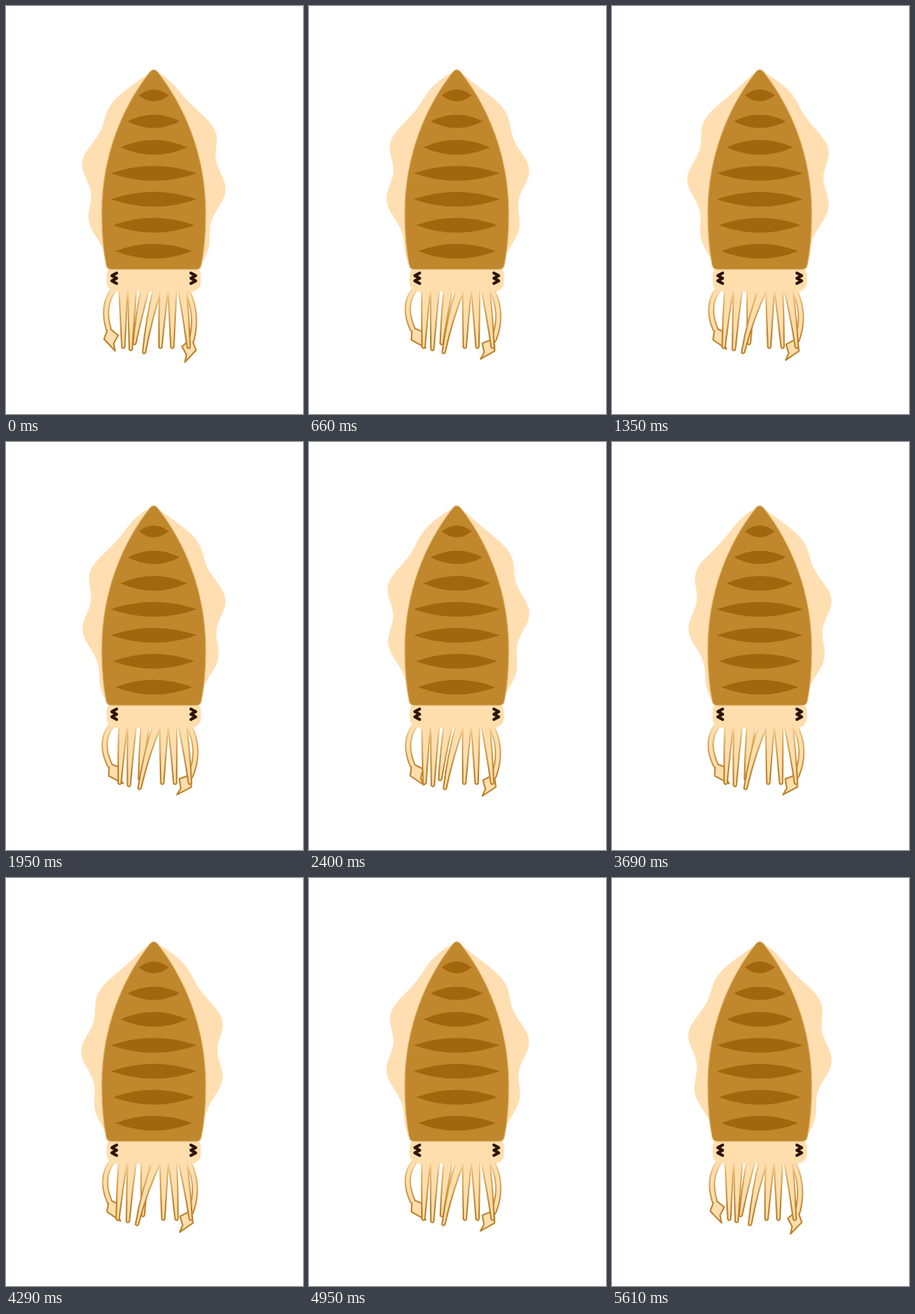
Recreate the animation shown at these times as an HTML page with a canvas. Size 400 px wide and 550 px high, loop 5.64 s.

```html
<!DOCTYPE html>
<html>
<head>
<meta charset="utf-8">
<style>
html, body { margin: 0; width: 400px; height: 550px; overflow: hidden; background: #fff }
canvas { display: block }
</style>
</head>
<body>
<canvas id="stage" width="400" height="550"></canvas>
<script>
const g = document.getElementById('stage').getContext('2d');
const CREAM = '#ffdead', FIN = '#ffdfb1', BROWN = '#c0872d', DARK = '#a0670f', EYE = '#2b1400';
const OUTLINE = '#bd8228', RIM = '#e0b065';
const HALF = 1410, STEP = 30, CENTER = 199, TOP = 87, BOTTOM = 352;

const fade = g.createLinearGradient(0, 380, 0, 445);
fade.addColorStop(0, CREAM);
fade.addColorStop(.3, '#dfb063');
fade.addColorStop(1, OUTLINE);

const body = new Path2D('M193 90Q199 82 205 90C240 135 269 200 269 280Q269 320 263 349' +
  'Q262 355 256 355H142Q136 355 135 349Q129 320 129 280C129 200 158 135 193 90Z');
const club = new Path2D('M0-2L6 14L-9 30L-7 20L-13 9Z');

// Base x, tip x, tip y, drift of the tip
const tentacles = [
  [188, 173, 455, 12], [158, 158, 460, -8], [170, 168, 463, -4], [205, 186, 467, -10],
  [213, 208, 460, 4], [224, 224, 460, 6], [237, 246, 460, 3]
];
const stripes = [20, 35, 45, 58, 58, 55, 52];

function paint(path, color, line, width) {
  if (color) {
    g.fillStyle = color;
    g.fill(path);
  }
  if (line) {
    g.strokeStyle = line;
    g.lineWidth = width;
    g.stroke(path);
  }
}

// Draws in coordinates that grow outward from the middle line
function mirrored(side, paintSide) {
  g.save();
  g.translate(CENTER, 0);
  g.scale(side, 1);
  paintSide();
  g.restore();
}

function drawArm(out, drop, swing) {
  const wristX = 51 + out - 1.5 * swing, wristY = 435 + drop;
  const arm = new Path2D();
  arm.moveTo(44 + out + 3 * swing, 382);
  arm.quadraticCurveTo(60 + out + 4 * swing, 404 + .7 * drop, wristX, wristY);
  paint(arm, null, fade, 8.5);
  g.save();
  g.translate(wristX, wristY);
  g.rotate(.33 * swing);
  paint(club, CREAM, OUTLINE, 2);
  g.restore();
  paint(arm, null, CREAM, 4.8);
}

function drawTentacle([base, tip, y, drift], progress) {
  const x = tip + drift * progress, bend = .35 * base + .65 * x;
  const shape = new Path2D();
  shape.moveTo(base - 6, 378);
  shape.quadraticCurveTo(bend - 4, 420, x - 2, y);
  shape.quadraticCurveTo(x, y + 3, x + 2, y);
  shape.quadraticCurveTo(bend + 4, 420, base + 6, 378);
  paint(shape, CREAM, fade, 2);
}

// A ripple travels along the fin; crest is the y of one of its peaks
function drawFin(crest) {
  const fin = new Path2D();
  for (let y = TOP; y <= BOTTOM; y++) {
    const u = (y - TOP) / (BOTTOM - TOP);
    const width = 62 * (u + Math.sin(Math.PI * u ** .8));
    const ripple = 6 * Math.sqrt(Math.abs(Math.sin(Math.PI * u)));
    fin.lineTo(width + ripple * Math.cos(2 * Math.PI * (y - crest) / 85), y);
  }
  fin.lineTo(0, BOTTOM);
  paint(fin, FIN);
}

function drawStripe(half, i) {
  const y = 120.5 + 35 * i, bulge = 2 * Math.min(10, 8 + i);
  const lens = new Path2D();
  lens.moveTo(CENTER - half, y);
  lens.quadraticCurveTo(CENTER, y - bulge, CENTER + half, y);
  lens.quadraticCurveTo(CENTER, y + bulge, CENTER - half, y);
  paint(lens, DARK);
}

function drawEye() {
  const eye = new Path2D();
  for (let i = 0; i < 5; i++) eye.lineTo(i % 2 ? 56.5 : 50, 360 + 3.5 * i);
  paint(eye, null, EYE, 4);
}

function draw(time) {
  const turn = Math.floor(time / STEP) * STEP % (2 * HALF);
  const p = HALF - Math.abs(HALF - turn);
  const swing = Math.sin(Math.PI * p / 1740);
  const travel = .0445 * p;

  g.fillStyle = '#fff';
  g.fillRect(0, 0, 400, 550);
  g.lineJoin = g.lineCap = 'round';

  mirrored(-1, () => drawArm(10, 0, swing));
  mirrored(1, () => drawArm(0, 15, swing));
  tentacles.forEach(t => drawTentacle(t, p / HALF));

  const head = new Path2D();
  head.roundRect(135.5, 350, 127, 35, 13);
  paint(head, CREAM);

  mirrored(-1, () => drawFin(210 - travel));
  mirrored(1, () => drawFin(250 - travel));
  paint(body, BROWN, RIM, 1.2);
  stripes.forEach(drawStripe);
  mirrored(-1, drawEye);
  mirrored(1, drawEye);
}

const start = performance.now();
function tick() {
  draw(performance.now() - start);
  requestAnimationFrame(tick);
}
tick();
</script>
</body>
</html>
```
